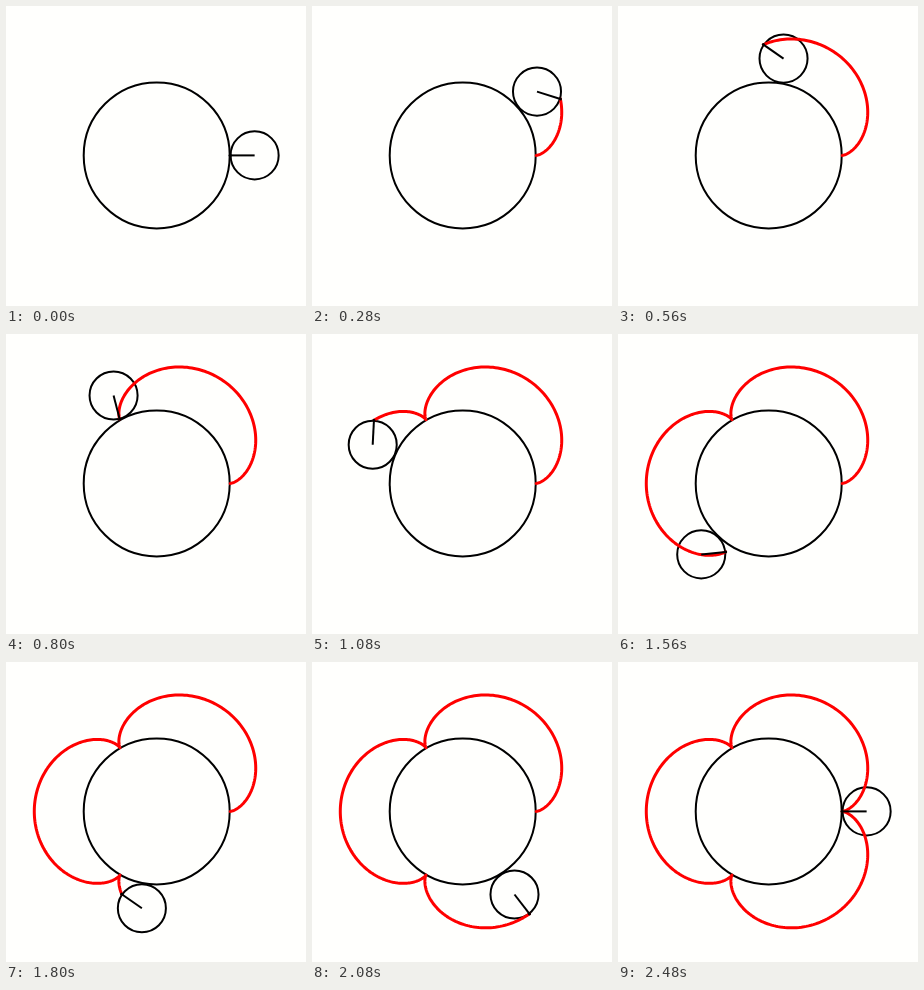
An HTML page for the animation above (2.92 s loop, 300 by 300 pixels).

```html
<!DOCTYPE html>
<html lang="en">
<head>
<meta charset="utf-8">
<title>Epicycloid</title>
<style>
  html, body { margin: 0; width: 100%; height: 100%; overflow: hidden; background: #fffffd; }
  svg { display: block; width: 100%; height: 100%; }
  circle, line, polyline { fill: none; stroke: #000; stroke-width: 2; }
  #trace { stroke: #f00; stroke-width: 3; stroke-linejoin: round; stroke-linecap: round; }
  #tip { fill: #000; stroke: none; }
</style>
</head>
<body>
<svg viewBox="0 0 300 300">
  <circle id="base"/>
  <circle id="wheel"/>
  <polyline id="trace"/>
  <line id="arm"/>
  <circle id="tip" r="1.6"/>
</svg>
<script>
  const CX = 150.7, CY = 149.4, R = 73.45, r = R / 3;
  const INSET = 0.45; // outlines sit slightly inside the rolling radii
  const STEPS = 62, STEP_MS = 40, LOOP_MS = 2920;
  const FINE = 8; // curve points per step

  const $ = id => document.getElementById(id);
  const set = (id, attrs) => {
    for (const k in attrs) $(id).setAttribute(k, attrs[k]);
  };

  const hub = a => [CX + (R + r) * Math.cos(a), CY - (R + r) * Math.sin(a)];
  const pen = a => {
    const [x, y] = hub(a);
    return [x - r * Math.cos(4 * a), y + r * Math.sin(4 * a)];
  };

  const angle = step => step / STEPS * 2 * Math.PI;
  const path = Array.from({ length: STEPS * FINE + 1 }, (_, i) => pen(angle(i / FINE)));

  set('base', { cx: CX, cy: CY, r: R - INSET });
  set('wheel', { r: r - INSET });

  let shown = -1;

  function draw(step) {
    const [hx, hy] = hub(angle(step));
    const [px, py] = pen(angle(step));
    set('wheel', { cx: hx, cy: hy });
    set('arm', { x1: hx, y1: hy, x2: px, y2: py });
    set('tip', { cx: px, cy: py });
    set('trace', { points: step ? path.slice(0, step * FINE + 1).join(' ') : '' });
  }

  function tick() {
    const t = performance.now() % LOOP_MS;
    const step = Math.min(STEPS, Math.floor(t / STEP_MS));
    if (step !== shown) draw(shown = step);
    requestAnimationFrame(tick);
  }

  tick();
</script>
</body>
</html>
```
